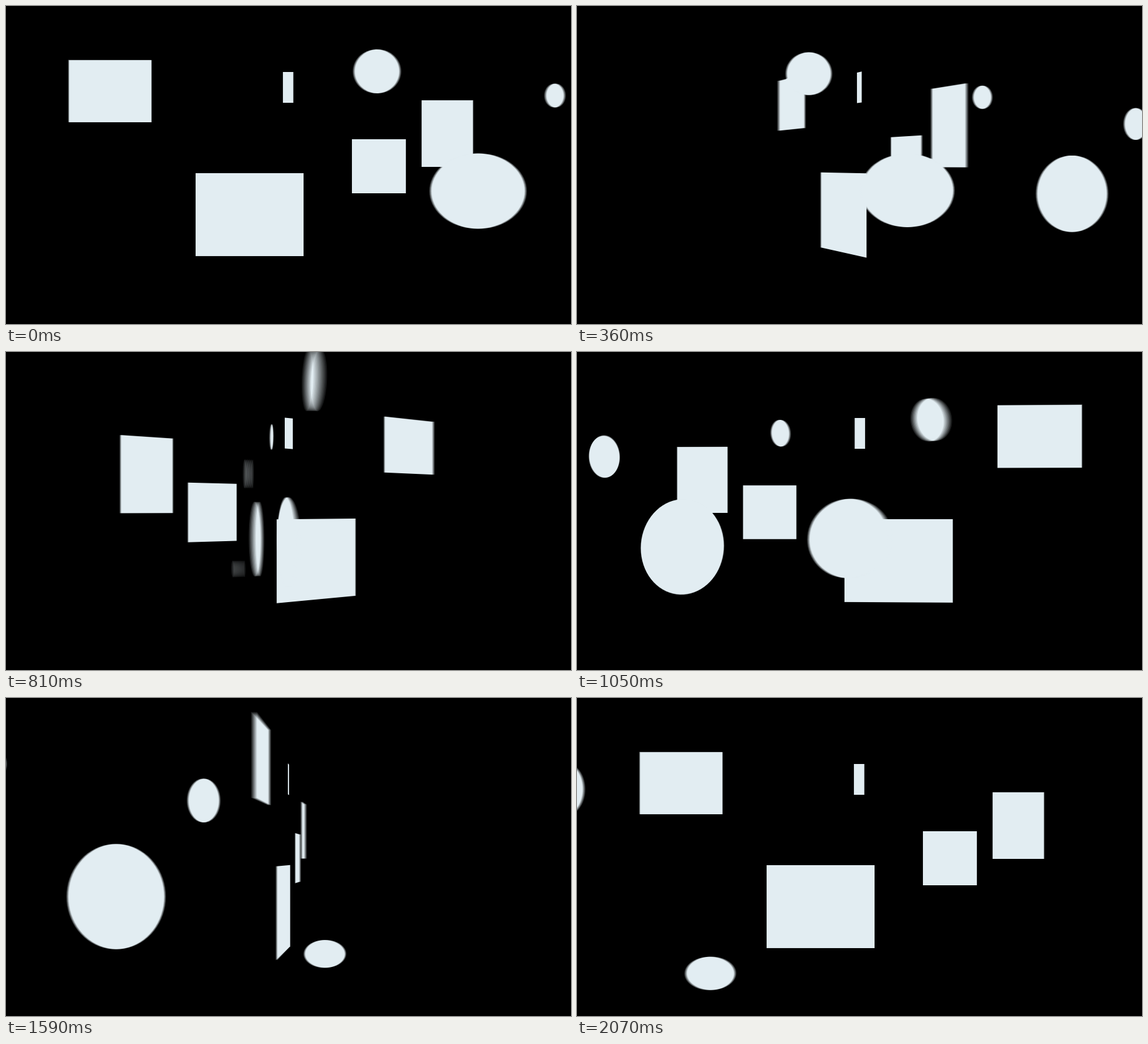
An HTML page with a canvas that plays this animation: 900 by 506 pixels, repeating every 2.1 s.

```html
<!DOCTYPE html>
<html>
<head>
<meta charset="utf-8">
<style>
html, body { margin: 0; height: 100%; overflow: hidden; background: #000; }
canvas { display: block; }
</style>
</head>
<body>
<canvas id="stage" width="900" height="506"></canvas>
<script>
const W = 900, H = 506, LENS = 1250;
const LOOP = 2100, STEP = 30, TURN = 2070;
const SPIN_START = 600, SPIN_TIME = 750, BEND = 668;
const SHUTTER = 7, SAMPLES = 10;

const view = document.getElementById('stage').getContext('2d');
const buffer = document.createElement('canvas');
buffer.width = W;
buffer.height = H;
const ctx = buffer.getContext('2d');

// Outlines given by centre and half size, measured from their turning axis
const ring = (n, phase, x, y, rx, ry) => Array.from({ length: n }, (_, i) => {
  const a = 2 * Math.PI * (i + phase) / n;
  return [x + rx * Math.cos(a), y + ry * Math.sin(a)];
});
const panel = (x, y, w, h) => ring(4, 0.5, x, y, w * Math.SQRT2, h * Math.SQRT2);
const disc = (x, y, rx, ry) => ring(72, 0, x, y, rx, ry);

const wall = [
  panel(-284.2, -117.5, 66, 49.5),
  panel(-0.6, -123.5, 8.3, 24.5),
  panel(144, 2, 43, 43),
  panel(253, -50, 41, 53),
  panel(-62, 79, 86, 66)
];
const strip = [
  disc(-297, -149, 37, 35),
  disc(-136, 41.5, 76, 60),
  disc(-13.5, -110.5, 15.5, 19),
  disc(133, 47, 58, 62.5),
  disc(237, -67, 19, 26),
  disc(381, 115, 24.5, 16.5)
];

// The strip drifts left on a shallow arc, then runs straight towards the viewer
function drift(t) {
  if (t < BEND) return [438 - 0.6315 * t + 2.8e-5 * t * t, 3.7e-4 * t * (600 - t)];
  const run = t - BEND;
  return [28.7 - 0.3974 * run, -17.5 - 0.3255 * run];
}

// Fill flat outlines turned about a vertical axis through (px, pz)
function draw(shapes, turns, [px, pz]) {
  const c = Math.cos(2 * Math.PI * turns), s = Math.sin(2 * Math.PI * turns);
  for (const points of shapes) {
    ctx.beginPath();
    for (const [u, y] of points) {
      const scale = LENS / (LENS + pz + u * s);
      ctx.lineTo(W / 2 + (px + u * c) * scale, H / 2 + y * scale);
    }
    ctx.fill();
  }
}

function scene(t) {
  ctx.fillStyle = '#000';
  ctx.fillRect(0, 0, W, H);
  ctx.fillStyle = '#e2edf2';
  draw(wall, -t / TURN, [0, 0]);
  draw(strip, Math.min(1, Math.max(0, (t - SPIN_START) / SPIN_TIME)), drift(t));
}

// Average several moments to get motion blur
function render(t) {
  for (let i = 0; i < SAMPLES; i++) {
    scene(t + SHUTTER * ((i + 0.5) / SAMPLES - 0.5));
    view.globalAlpha = 1 / (i + 1);
    view.drawImage(buffer, 0, 0);
  }
}

const start = performance.now();
let shown = -1;
function tick() {
  const t = Math.max(0, performance.now() - start) % LOOP;
  const step = Math.floor(t / STEP);
  if (step !== shown) render((shown = step) * STEP);
  requestAnimationFrame(tick);
}
tick();
</script>
</body>
</html>
```
